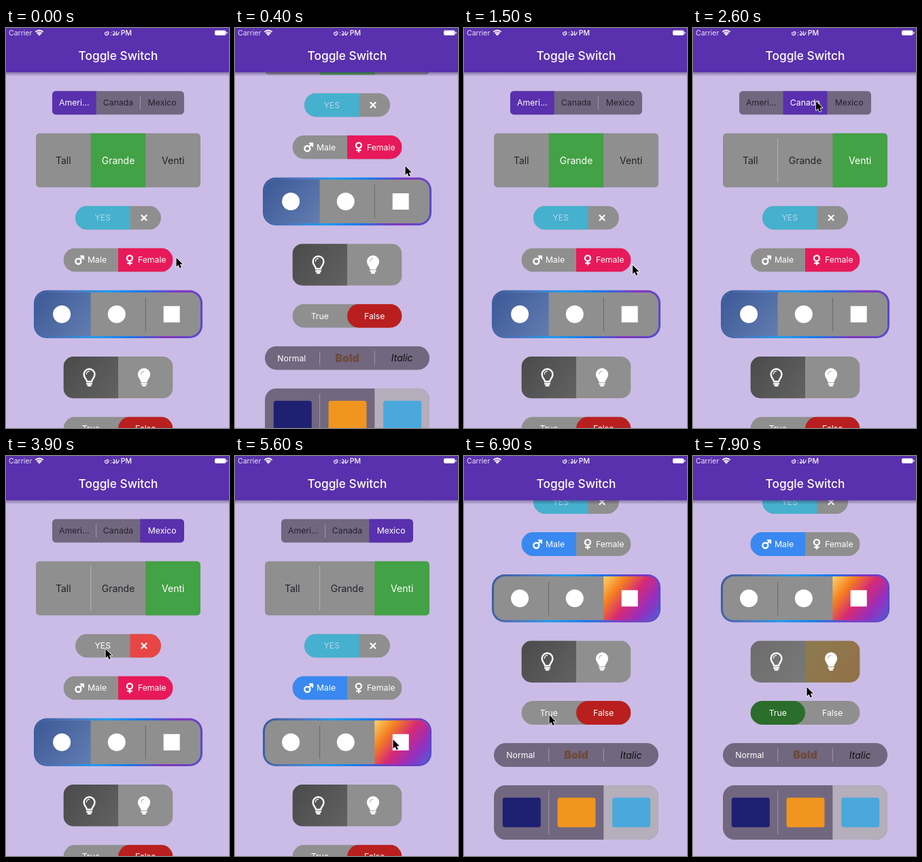
Write an HTML page with a canvas that moves like this. It is 328 px wide and 588 px high and loops after 8000 ms.

```html
<!DOCTYPE html>
<html lang="en">
<head>
<meta charset="utf-8">
<title>Toggle Switch</title>
<style>
html, body { margin: 0; width: 100%; height: 100%; overflow: hidden; background: #cabce6; }
canvas { display: block; width: 328px; height: 588px; }
</style>
</head>
<body>
<canvas id="stage"></canvas>
<script>
const W = 328, H = 588, LOOP = 8000, BAR = 65;
const MID = 165, TOP = 92.5, GAP = 27, CELL = 80.7;
const GREY = '#8f8f8f', MAUVE = '#71677f', PURPLE = '#5930ad', WHITE = '#fff', INK = '#25222b';
const LAVENDER = '#cabce6', GREEN = '#43a146';
const FONT = 'Inter, Roboto, sans-serif';

const canvas = document.getElementById('stage');
const ctx = canvas.getContext('2d');
const scale = Math.max(1, window.devicePixelRatio || 1);
canvas.width = W * scale;
canvas.height = H * scale;

const START = { x: 250, y: 337 };
const TAP_DELAY = 80;

// Pointer moves; a move may drag the page or end in a tap on a cell
const MOVES = [
  { at: 100, dur: 430, x: 250, y: 165, scroll: 211.5 },
  { at: 550, dur: 190, x: 249, y: 286 },
  { at: 750, dur: 358, x: 249, y: 497.5, scroll: -211.5 },
  { at: 1300, dur: 400, x: 246, y: 200, tap: 'size', cell: 2 },
  { at: 2000, dur: 350, x: 180.5, y: 107, tap: 'country', cell: 1 },
  { at: 2700, dur: 350, x: 230, y: 111, tap: 'country', cell: 2 },
  { at: 3250, dur: 310, x: 205, y: 283, tap: 'answer', cell: 1 },
  { at: 3700, dur: 180, x: 146, y: 283, tap: 'answer', cell: 0 },
  { at: 4150, dur: 350, x: 128, y: 345, tap: 'gender', cell: 0 },
  { at: 4750, dur: 300, x: 163, y: 420, tap: 'social', cell: 1 },
  { at: 5200, dur: 240, x: 232, y: 416, tap: 'social', cell: 2 },
  { at: 5650, dur: 230, x: 209, y: 541 },
  { at: 5950, dur: 350, x: 207, y: 317, scroll: 224 },
  { at: 6300, dur: 250, x: 207, y: 317, scroll: -12.5 },
  { at: 6550, dur: 350, x: 125, y: 380, tap: 'truth', cell: 0 },
  { at: 7100, dur: 320, x: 200, y: 310, tap: 'light', cell: 1 },
  { at: 7560, dur: 320, x: 167, y: 339 }
];

const clamp = v => Math.min(1, Math.max(0, v));
const ease = p => p * p * (3 - 2 * p);

function gradient(x, y, w, h, colors) {
  const g = ctx.createLinearGradient(x, y, x + w, y + h);
  colors.forEach((c, i) => g.addColorStop(i / (colors.length - 1), c));
  return g;
}

function box(x, y, w, h, r, fill) {
  ctx.beginPath();
  ctx.roundRect(x, y, w, h, r);
  ctx.fillStyle = fill;
  ctx.fill();
}

function text(str, x, y, color, size = 12.25, style = '400', align = 'center') {
  ctx.font = `${style} ${size}px ${FONT}`;
  ctx.textAlign = align;
  ctx.fillStyle = color;
  ctx.fillText(str, x, y);
}

function line(path, width, color = WHITE) {
  ctx.lineWidth = width;
  ctx.strokeStyle = color;
  ctx.lineCap = ctx.lineJoin = 'round';
  ctx.stroke(new Path2D(path));
}

function at(x, y, paint) {
  ctx.save();
  ctx.translate(x, y);
  paint();
  ctx.restore();
}

function ring(x, y, r, width, from = 0, to = Math.PI * 2) {
  ctx.beginPath();
  ctx.arc(x, y, r, from, to);
  ctx.lineWidth = width;
  ctx.lineCap = 'butt';
  ctx.strokeStyle = WHITE;
  ctx.stroke();
}

// Icons, drawn around the origin
const cross = () => line('M-3.5 -3.5 L3.5 3.5 M3.5 -3.5 L-3.5 3.5', 2.3);

function male() {
  ring(-1.7, 2, 4, 2.4);
  line('M1.5 -1.2 L5.4 -5.1 M1.8 -5.6 H6 V-1.4', 2.2);
}

function female() {
  ring(0, -2.6, 4, 2.4);
  line('M0 2 V7 M-3 4.6 H3', 2.1);
}

function bulb(filled) {
  const glass = 'M-3.6 6 C-3.6 2 -7.9 1 -7.9 -4.6 A7.9 7.9 0 0 1 7.9 -4.6 C7.9 1 3.6 2 3.6 6 Z';
  if (filled) {
    ctx.fillStyle = WHITE;
    ctx.fill(new Path2D(glass));
  }
  line(glass, 2.4);
  line('M-3.4 9.3 H3.4 M-1.8 12 H1.8', 2.5);
  line('M-4.3 -4.8 A4.3 4.3 0 0 1 0 -9.1', 1.2, filled ? '#b5b5b5' : WHITE);
}

// Rows from top to bottom; label(i, x, y, active) draws the content of a cell
const ROWS = [
  {
    name: 'country', h: 35, r: 6, w: [64.7, 64.7, 64.7], on: 0, off: MAUVE,
    fill: [PURPLE, PURPLE, PURPLE],
    label: (i, x, y, on) => text(['Ameri…', 'Canada', 'Mexico'][i], x, y + 4.3, on ? WHITE : INK)
  },
  {
    name: 'size', h: 80, r: 6, w: [CELL, CELL, CELL], on: 1, off: GREY,
    fill: [GREEN, GREEN, GREEN],
    label: (i, x, y, on) => text(['Tall', 'Grande', 'Venti'][i], x, y + 5, on ? WHITE : INK, 14)
  },
  {
    name: 'answer', h: 35, r: 17.5, w: [80.5, 45.5], on: 0, off: GREY,
    fill: ['#45b1ce', '#e74645'],
    label: (i, x, y, on) => i ? at(x - 2.2, y, cross)
      : text('YES', x, y + 4.4, on ? '#b5d3ec' : WHITE)
  },
  {
    name: 'gender', h: 35, r: 17.5, w: [80.5, 80.5], on: 1, off: GREY,
    fill: ['#3989f0', '#e8195a'],
    label: (i, x, y) => {
      at(x - (i ? 23.3 : 16.7), y, i ? female : male);
      text(i ? 'Female' : 'Male', x - (i ? 11.3 : 4.7), y + 4.4, WHITE, 12.25, '400', 'left');
    }
  },
  {
    name: 'social', h: 70.5, r: 16, w: [CELL, CELL, CELL], on: 0, off: GREY, rule: '#66696e',
    border: ['#3b5998', '#4b74bd', '#1e9cf0', '#1877ea', '#8433bd', '#4f4fd0'],
    fill: [
      ['#3b5998', '#637db0'],
      ['#00aeff', '#0077f2'],
      ['#fbd56f', '#f5811f', '#d62976', '#962fbf', '#4f5bd5']
    ],
    label: (i, x, y) => i < 2 ? box(x - 15.2, y - 13, 26, 26, 13, WHITE)
      : box(x - 14, y - 12, 24, 24, 0, WHITE)
  },
  {
    name: 'light', h: 61.5, r: 15, w: [80.5, 80.5], on: 0, off: GREY, fade: 800,
    fill: [['#4a4a4a', '#626262'], ['#896711', '#975100']],
    label: (i, x, y) => at(x - 2.2, y, () => bulb(i))
  },
  {
    name: 'truth', h: 35, r: 17.5, w: [80.5, 80.5], on: 1, off: GREY, pill: true,
    fill: ['#2b6d2b', '#ba1f1f'],
    label: (i, x, y) => text(i ? 'False' : 'True', x, y + 4.4, WHITE)
  },
  {
    name: 'style', h: 35, r: 17.5, w: [CELL, CELL, CELL], on: -1, off: MAUVE,
    label: (i, x, y) => [
      () => text('Normal', x - 1, y + 4.4, WHITE),
      () => text('Bold', x, y + 5.6, '#6d4b3b', 16, '900'),
      () => text('Italic', x, y + 5, '#111', 14, 'italic 400')
    ][i]()
  },
  {
    name: 'card', h: 80, r: 17, w: [CELL, CELL, CELL], on: 2, off: MAUVE,
    fill: [MAUVE, MAUVE, '#b5aebb'],
    label: (i, x, y) => box(x - 27.5, y - 21.8, 56, 43.5, 3.5, ['#1e2172', '#f0951f', '#4aa8dc'][i])
  }
];

// Active cell of a row, the one before it and the time of the change
function selection(row, t) {
  let now = row.on, before = row.on, since = 0;
  for (const m of MOVES) {
    const when = m.at + m.dur + TAP_DELAY;
    if (m.tap === row.name && t >= when) [before, now, since] = [now, m.cell, when];
  }
  return { now, before, p: row.fade ? clamp((t - since) / row.fade) : 1 };
}

function drawRow(row, y, t) {
  const total = row.w.reduce((a, b) => a + b);
  const left = MID - total / 2;
  const { now, before, p } = selection(row, t);
  const pad = row.border ? 3 : 0;
  const h = row.h - pad * 2, top = y + pad;
  if (pad) {
    box(left - pad, y, total + pad * 2, row.h, row.r + pad,
      gradient(left - pad, y, total + pad * 2, row.h, row.border));
  }
  ctx.save();
  ctx.beginPath();
  ctx.roundRect(left, top, total, h, row.r);
  ctx.clip();
  ctx.fillStyle = row.off;
  ctx.fillRect(left, top, total, h);
  let x = left;
  row.w.forEach((w, i) => {
    const level = i === now ? (now === before ? 1 : p) : i === before ? 1 - p : 0;
    if (level > 0) {
      const f = row.fill[i];
      ctx.globalAlpha = level;
      box(x, top, w, h, row.pill ? row.r : 0, Array.isArray(f) ? gradient(x, top, w, h, f) : f);
      ctx.globalAlpha = 1;
    }
    // A rule separates two inactive neighbours
    if (i && now !== i && now !== i - 1 && row.w.length > 2) {
      ctx.fillStyle = row.rule || 'rgba(255,255,255,.33)';
      ctx.fillRect(x - 0.5, top + 7.5, 1, h - 15);
    }
    row.label(i, x + w / 2, top + h / 2, i === now);
    x += w;
  });
  ctx.restore();
}

function drawHeader() {
  const shade = ctx.createLinearGradient(0, BAR, 0, BAR + 6);
  shade.addColorStop(0, 'rgba(40,20,80,.42)');
  shade.addColorStop(1, 'rgba(40,20,80,0)');
  ctx.fillStyle = shade;
  ctx.fillRect(0, BAR, W, 6);
  ctx.fillStyle = PURPLE;
  ctx.fillRect(0, 0, W, BAR);

  text('Carrier', 4, 11, '#e9e2f6', 10.5, '400', 'left');
  for (const r of [2, 5, 8]) ring(49, 11.5, r, r > 2 ? 1.9 : 3, -Math.PI * 0.75, -Math.PI * 0.25);
  // Bengali clock digits as strokes, since no installed font is sure to have them
  line('M146 6.2 C144.8 9 146 11 148.4 10.6 C151.6 10 151.8 5.8 149.5 5.2 C147.4 5 147.4 8 149.2 8'
    + ' M157.8 5 C161 6 161.4 10 158.9 10.6 C156.8 10.8 157 8.4 158.8 8.6'
    + ' M162.6 5 V10.6 C164.2 10.6 166 8 166.2 6 M154.4 6.6 V6.7 M154.4 10.4 V10.5', 1.1);
  text('PM', 168.8, 11, WHITE, 10.5, '500', 'left');
  box(307, 3.5, 16.5, 7.3, 2, WHITE);
  box(324.3, 5.7, 1.2, 3, 0.6, WHITE);
  text('Toggle Switch', MID, 47, WHITE, 17.3, '500');
}

function drawPointer() {
  const arrow = new Path2D('M.5 .8 V14 L3.5 11.2 L5.5 16 L7.9 15 L5.9 10.3 H10 Z');
  ctx.lineWidth = 1.6;
  ctx.lineJoin = 'round';
  ctx.strokeStyle = WHITE;
  ctx.stroke(arrow);
  ctx.fillStyle = '#000';
  ctx.fill(arrow);
}

function draw(t) {
  let { x, y } = START, scroll = 0;
  for (const m of MOVES) {
    const p = ease(clamp((t - m.at) / m.dur));
    x += (m.x - x) * p;
    y += (m.y - y) * p;
    scroll += (m.scroll || 0) * p;
  }
  ctx.setTransform(scale, 0, 0, scale, 0, 0);
  ctx.fillStyle = LAVENDER;
  ctx.fillRect(0, 0, W, H);
  let top = TOP - scroll;
  for (const row of ROWS) {
    drawRow(row, top, t);
    top += row.h + GAP;
  }
  drawHeader();
  at(x, y, drawPointer);
}

const start = performance.now();
function tick() {
  draw((performance.now() - start) % LOOP);
  requestAnimationFrame(tick);
}
tick();
</script>
</body>
</html>
```
